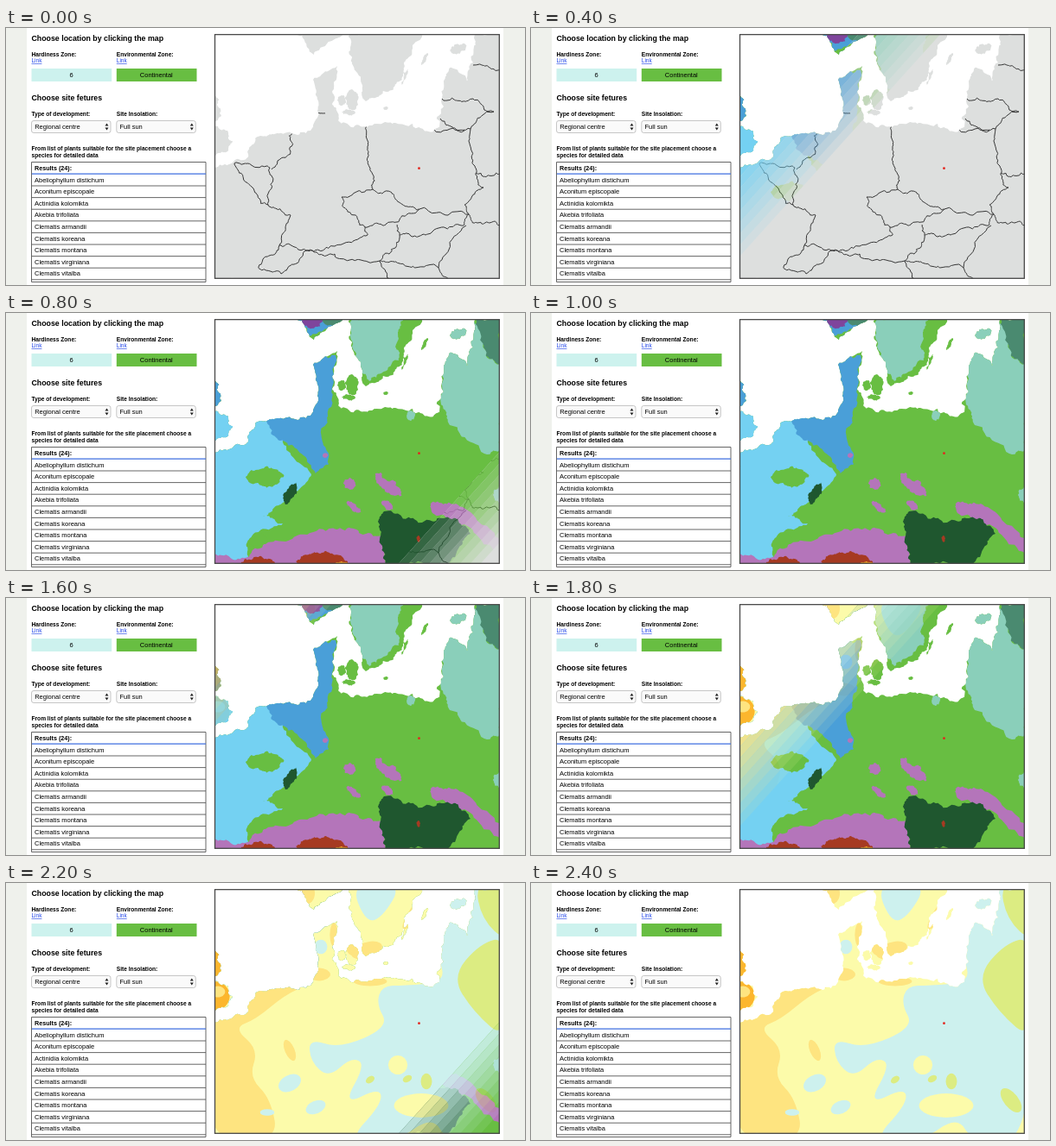
An HTML page with a canvas that plays this animation: 600x298 px, repeating every 3000 ms.

```html
<!DOCTYPE html>
<html lang="en">
<head>
<meta charset="utf-8">
<title>Plant site map</title>
<style>
html, body { margin: 0; width: 100%; height: 100%; overflow: hidden; background: #eff1ec; }
canvas, svg { position: absolute; left: 0; top: 0; width: 600px; height: 298px; }
#page { position: absolute; left: 24px; top: 0; width: 551px; height: 298px; background: #fff; }
text { font-family: "Liberation Sans", Arial, sans-serif; font-size: 7.5px; fill: #000; }
.title { font-size: 8.8px; font-weight: bold; }
.label { font-size: 6.62px; font-weight: bold; }
.head { font-size: 7.2px; font-weight: bold; }
.link { font-size: 6.5px; fill: #2448e8; text-decoration: underline; }
.mid { text-anchor: middle; }
.select { fill: #fafafa; stroke: #b9b9b9; stroke-width: .8; }
.line { fill: none; stroke: #555; stroke-width: .9; }
</style>
</head>
<body>
<div id="page"></div>
<canvas id="map" width="600" height="298"></canvas>
<svg viewBox="0 0 600 298">
  <text class="title" x="29.5" y="15">Choose location by clicking the map</text>
  <text class="title" x="29.5" y="83.5">Choose site fetures</text>
  <g id="form"></g>
  <text class="label" x="29.5" y="142">From list of plants suitable for the site placement choose a</text>
  <text class="label" x="29.5" y="149.5">species for detailed data</text>
  <text class="head" x="33" y="164.7">Results (24):</text>
  <g id="table"></g>
  <path class="line" d="M29.5 294.5V155.5H231V294.5Z"/>
  <path d="M30 169.2H231" stroke="#3f6fe0" stroke-width="1.3"/>
  <rect x="241.5" y="7.6" width="328.8" height="282.7" fill="none" stroke="#484848" stroke-width="1.3"/>
  <circle cx="477.5" cy="162.7" r="1.4" fill="#e3261f"/>
</svg>
<script>
const column = (x, zone, value, color, question, answer) => `
  <text class="label" x="${x}" y="32.5">${zone}</text>
  <text class="link" x="${x}" y="40">Link</text>
  <rect x="${x}" y="47" width="92.7" height="15" fill="${color}"/>
  <text class="mid" x="${x + 46}" y="57">${value}</text>
  <text class="label" x="${x}" y="101.5">${question}</text>
  <rect class="select" x="${x}" y="107.5" width="91.5" height="14" rx="2.5"/>
  <text x="${x + 3.7}" y="117.2">${answer}</text>
  <path d="M${x + 85} 113.5l2-3 2 3zm0 2l2 3 2-3z" fill="#222"/>`;
document.getElementById('form').innerHTML =
  column(29.5, 'Hardiness Zone:', '6', '#cdf2ee', 'Type of development:', 'Regional centre') +
  column(127.8, 'Environmental Zone:', 'Continental', '#68be42', 'Site Insolation:', 'Full sun');

const plants = ['Abeliophyllum distichum', 'Aconitum episcopale', 'Actinidia kolomikta',
  'Akebia trifoliata', 'Clematis armandii', 'Clematis koreana', 'Clematis montana',
  'Clematis virginiana', 'Clematis vitalba'];
document.getElementById('table').innerHTML = plants.map((name, i) => {
  const y = 183 + 13.6 * i;
  return `<text x="33" y="${y - 4.5}">${name}</text><path class="line" d="M29.5 ${y}H231"/>`;
}).join('');

const LEFT = 241, TOP = 7, RIGHT = 571, BOTTOM = 291, SLOPE = 1.11;
let seed = 7;
const random = () => (seed = seed * 16807 % 2147483647) / 2147483647;
const points = text => text.split(' ').map(pair => pair.split(',').map(Number));
const oval = (x, y, rx, ry, tilt = 0) => Array.from({ length: 8 }, (_, i) => {
  const u = rx * Math.cos(i * Math.PI / 4), v = ry * Math.sin(i * Math.PI / 4);
  return [x + u * Math.cos(tilt) - v * Math.sin(tilt), y + u * Math.sin(tilt) + v * Math.cos(tilt)];
});

// Fractal outline: every pass shifts the middle of each edge by a random amount.
function rough(shape, closed = true) {
  let list = typeof shape === 'string' ? points(shape) : shape;
  for (let pass = 0; pass < 4; pass++) {
    list = list.flatMap((p, i) => {
      if (!closed && i === list.length - 1) return [p];
      const q = list[(i + 1) % list.length];
      const size = Math.min(6, Math.hypot(q[0] - p[0], q[1] - p[1]) * .45);
      return [p, [0, 1].map(k => (p[k] + q[k]) / 2 + (random() - .5) * size)];
    });
  }
  const path = new Path2D();
  list.forEach(p => path.lineTo(...p));
  if (closed) path.closePath();
  return path;
}
function smooth(shape) {
  const list = typeof shape === 'string' ? points(shape) : shape;
  const path = new Path2D(), n = list.length;
  const mid = i => [0, 1].map(k => (list[i % n][k] + list[(i + 1) % n][k]) / 2);
  path.moveTo(...mid(0));
  for (let i = 1; i <= n; i++) path.quadraticCurveTo(...list[i % n], ...mid(i));
  return path;
}

const land = new Path2D();
const continent = '239,162 278,151 288,128 310,123 352,119 360,96 355,60 383,44 377,88 384,107 402,115 428,111 470,111 488,120 501,115 506,62 513,46 533,61 540,40 543,5 573,5 573,293 239,293';
const sweden = '398,5 400,40 416,85 436,73 458,60 460,40 483,5';
const norway = '333,5 356,31 393,5';
const britain = [oval(238, 94, 10, 17), oval(242, 131, 20, 17)];
const islands = [oval(388, 84, 5, 6), oval(400, 83, 7, 12), oval(396, 98, 8, 3), oval(439, 93, 3, 2),
  oval(484, 36, 2, 8, .5), oval(461, 57, 1.5, 10, .4), oval(523, 24, 10, 6, -.3)];
[continent, sweden, norway, ...britain, ...islands].forEach(shape => land.addPath(rough(shape)));

function makeLayer(base, paint) {
  const canvas = document.createElement('canvas');
  canvas.width = 600;
  canvas.height = 298;
  const g = canvas.getContext('2d');
  g.beginPath();
  g.rect(LEFT, TOP, RIGHT - LEFT, BOTTOM - TOP);
  g.clip();
  g.clip(land);
  g.fillStyle = base;
  g.fillRect(0, 0, 600, 298);
  paint(g);
  return canvas;
}
const filler = (g, outline) => (color, ...shapes) => {
  g.fillStyle = color;
  shapes.forEach(shape => g.fill(outline(shape)));
};

const borders = makeLayer('#dddfde', g => {
  g.strokeStyle = '#363636';
  g.lineJoin = 'round';
  [
    '353,97 369,99', '419,108 418,140 425,172 424,187',
    '424,187 388,196 395,213 415,231 440,227 478,210', '424,187 446,191 452,200 478,210',
    '478,210 535,216 530,228 485,240 455,240 452,228',
    '535,216 530,205 552,185 542,160 537,117',
    '488,119 537,117 564,97 540,82 504,82', '502,105 530,119', '540,43 571,48',
    '543,168 571,169', '535,216 545,226 571,229', '532,229 500,278 455,273 432,270',
    '455,240 443,262 432,270 380,262 347,258', '415,231 418,240 380,253 347,258',
    '316,252 329,217 303,205 285,185 264,157', '264,157 305,162 303,205', '330,121 329,143 307,164',
    '347,258 316,252 292,277 318,285 347,258', '432,270 443,291', '500,278 512,291'
  ].forEach(line => g.stroke(rough(line, false)));
});

const zones = makeLayer('#68be42', g => {
  const fill = filler(g, rough);
  fill('#74d1f2', oval(242, 131, 25, 22), '239,140 310,105 320,150 353,187 320,220 297,235 320,244 281,262 279,285 239,285');
  fill('#68be42', oval(299, 190, 22, 11), oval(292, 264, 11, 8));
  fill('#4a9fd8', oval(238, 94, 14, 18), norway,
    '345,50 381,49 372,120 364,137 373,175 358,186 335,157 314,146 300,115 350,112');
  fill('#7f459c', oval(354, 9, 13, 9));
  fill('#4a8a70', oval(380, 8, 14, 8), '543,5 541,15 555,50 573,62 573,5');
  fill('#68be42', oval(364, 25, 20, 4, -.3));
  fill('#8acfba', '399,5 404,50 420,79 454,55 453,22 460,5',
    '500,10 541,10 555,50 573,62 573,159 556,164 513,130 503,106', oval(468, 119, 5, 6), oval(570, 211, 7, 9));
  fill('#b475ba', '239,279 280,283 300,268 360,252 402,250 438,262 442,293 239,293',
    '491,221 520,221 573,265 573,281 530,245 493,232',
    oval(397, 198, 7, 7), oval(442, 199, 20, 7, .7), oval(402, 225, 10, 4, .6), oval(441, 223, 8, 4, .6), oval(369, 165, 3, 3));
  fill('#1f572f', '430,242 437,230 481,243 520,238 537,256 511,293 438,293 435,270', oval(329, 209, 14, 5, -1.1));
  fill('#a63a22', oval(291, 290, 20, 7), oval(365, 288, 30, 10), oval(477, 262, 2, 4));
  fill('#f0a020', oval(388, 291, 8, 3));
});

const hardiness = makeLayer('#fcfbaa', g => {
  const fill = filler(g, smooth);
  fill('#fee480', '230,150 285,135 300,112 355,115 322,130 289,158 263,168 292,193 281,225 306,250 315,300 230,300',
    oval(346, 12, 12, 14), oval(362, 106, 14, 8), oval(402, 76, 9, 9), oval(417, 78, 20, 10, -.3), oval(474, 32, 7, 28, .6),
    oval(379, 60, 5, 15), oval(328, 194, 6, 14, -.4), oval(421, 114, 21, 6), oval(450, 270, 13, 6));
  fill('#fcb62d', oval(238, 94, 13, 18), oval(242, 131, 18, 18));
  fill('#fee480', oval(245, 126, 9, 7));
  fill('#cdf1ee', oval(364, 74, 8, 9), '398,0 416,46 435,40 459,0',
    '435,119 428,140 443,167 386,192 350,180 352,207 373,226 399,202 416,210 389,258 433,237 434,257 394,300 451,300 493,270 510,300 580,300 580,0 505,0 500,85 508,115 460,119',
    oval(328, 232, 15, 10, -.5), oval(358, 260, 13, 8, -.4), oval(302, 266, 9, 4));
  fill('#fcfbaa', oval(480, 258, 34, 15), oval(453, 211, 12, 12));
  fill('#dcec82', '580,62 548,70 515,109 541,150 580,184', '542,0 550,42 580,70 580,0',
    oval(421, 228, 6, 4, -.6), oval(464, 227, 6, 4, -.5), oval(486, 230, 7, 10), oval(555, 252, 18, 9, .9));
});

const screen = document.getElementById('map').getContext('2d');
const fronts = [150, 258, 455, 625], SOFT = 105, BANDS = 8;

function drawStrip(layer, from, to, alpha) {
  const edge = (s, y) => LEFT + (s - (y - TOP)) / SLOPE;
  screen.save();
  screen.beginPath();
  screen.moveTo(edge(from, TOP), TOP);
  screen.lineTo(edge(to, TOP), TOP);
  screen.lineTo(edge(to, BOTTOM), BOTTOM);
  screen.lineTo(edge(from, BOTTOM), BOTTOM);
  screen.clip();
  screen.globalAlpha = alpha;
  screen.drawImage(layer, 0, 0);
  screen.restore();
}
function wipe(layer, front) {
  const back = front - SOFT, width = SOFT / BANDS;
  drawStrip(layer, -400, back, 1);
  for (let i = 0; i < BANDS; i++)
    drawStrip(layer, back + i * width, back + (i + 1) * width, (BANDS - i) / (BANDS + 1));
}
function draw(now) {
  const step = Math.floor(now % 3000 / 200);
  screen.clearRect(0, 0, 600, 298);
  screen.drawImage(step < 5 ? borders : step < 12 ? zones : hardiness, 0, 0);
  if (step > 0 && step < 5) wipe(zones, fronts[step - 1]);
  if (step > 7 && step < 12) wipe(hardiness, fronts[step - 8]);
}
const start = performance.now();
function tick() {
  draw(performance.now() - start);
  requestAnimationFrame(tick);
}
tick();
</script>
</body>
</html>
```
